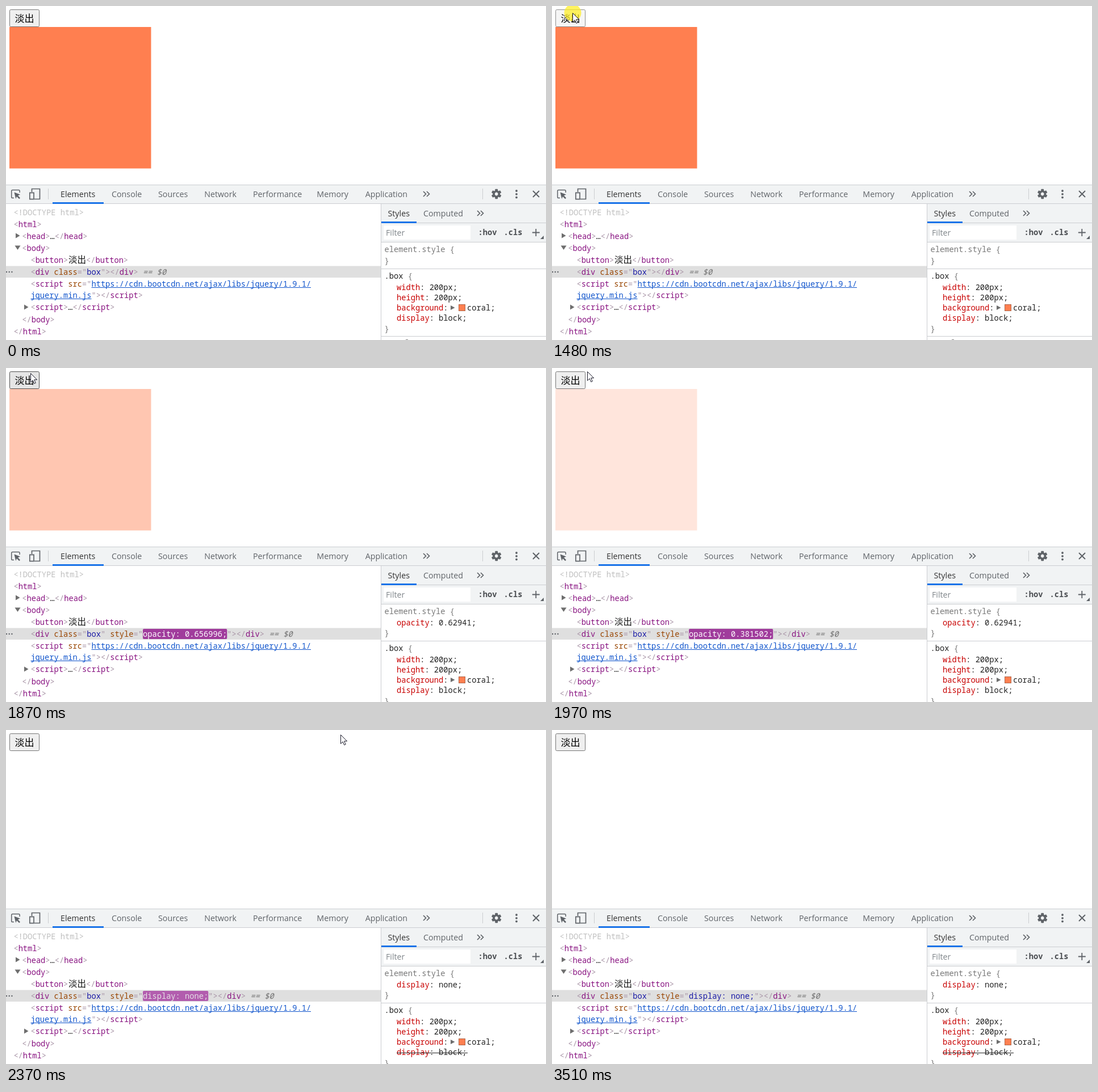
Write an HTML page that moves like this. It is 951x589 px and loops after 3990 ms.

```html
<!DOCTYPE html>
<html lang="en">
<head>
<meta charset="utf-8">
<title>Fade out in the inspector</title>
<style>
  html, body { margin: 0; width: 100%; height: 100%; overflow: hidden; background: #fff; }
  svg { display: block; width: 951px; height: 589px; }
  text { white-space: pre; }
  .code { font: 13.73px "Noto Sans Mono", "DejaVu Sans Mono", monospace; }
  .ui { font: 14.25px "Open Sans", "Noto Sans", sans-serif; }
  .cjk { font-family: "Noto Sans CJK SC", "Noto Sans CJK", sans-serif; font-weight: 300; }
  .bold { font-weight: bold; }
  .italic { font-style: italic; }
</style>
</head>
<body>
<svg id="stage" viewBox="0 0 951 589" xmlns="http://www.w3.org/2000/svg"></svg>
<script>
const NS = 'http://www.w3.org/2000/svg';
const stage = document.getElementById('stage');
const LOOP = 3990;
const CHAR = 8.238;

const TAG = '#a894a6', NAME = '#881280', ATTR = '#994500', VALUE = '#1a1aa6';
const LINK = '#1155cc', PROP = '#c80000', INK = '#222', GRAY = '#777', ICON = '#5f6368';
const BAR = '#f1f3f4', EDGE = '#cbcdd1', BLUE = '#1a73e8';

function el(type, attrs, parent = stage) {
  const node = document.createElementNS(NS, type);
  for (const key in attrs) node.setAttribute(key, attrs[key]);
  parent.appendChild(node);
  return node;
}
const rect = (x, y, width, height, fill, parent) => el('rect', { x, y, width, height, fill }, parent);
const path = (d, fill, parent) => el('path', { d, fill }, parent);
const stroke = (d, color, width = 1.6) =>
  el('path', { d, fill: 'none', stroke: color, 'stroke-width': width });

function label(x, y, content, fill, cls = 'ui', parent = stage) {
  const node = el('text', { x, y, fill, class: cls }, parent);
  node.textContent = content;
  return node;
}

// Coloured runs: color, text, color, text ...
function setRuns(node, runs) {
  node.textContent = '';
  for (let i = 0; i < runs.length; i += 2) {
    const span = el('tspan', { fill: runs[i] }, node);
    span.textContent = runs[i + 1];
  }
  return node;
}
const line = (x, y, runs, parent = stage) => setRuns(el('text', { x, y, class: 'code' }, parent), runs);
const open = name => [TAG, '<', NAME, name, TAG, '>'];
const close = name => [TAG, '</', NAME, name, TAG, '>'];

// Page
const box = rect(6, 37, 249.5, 249.5, '#ff7f50');
const button = el('rect', { x: 6.5, y: 6.5, width: 52, height: 30, rx: 2 });
const caption = label(15.5, 28, '淡出', '#000', 'cjk');
caption.setAttribute('font-size', 17.1);
const halo = el('circle', { cx: 36.5, cy: 12, r: 15, fill: '#ffee22', opacity: .72 });

// Toolbar
rect(0, 315, 951, 34, BAR);
rect(0, 315, 951, 1, EDGE);
rect(0, 348, 951, 1, EDGE);
rect(82, 346, 90, 3, BLUE);
rect(74, 322, 1, 19, EDGE);
rect(839, 322, 1, 19, EDGE);
stroke('M14 338.5H11.5Q9.7 338.5 9.7 336.7V326.3Q9.7 324.5 11.5 324.5H22.3Q24.1 324.5 24.1 326.3V329', ICON, 1.5);
path('M14.5 328.5L25 332.6L21 334.3L25 338.6L23.2 340.3L19 336L17.2 340Z', ICON);
stroke('M45.5 328V322.5H59.5V340.5H50', ICON, 1.7);
stroke('M41.8 329.3H49V340.7H41.8Z', ICON, 1.7);
[['Elements', 96], ['Console', 186], ['Sources', 268], ['Network', 349.2], ['Performance', 435],
 ['Memory', 547.3], ['Application', 632.7]].forEach(([name, x], i) => label(x, 337, name, i ? ICON : '#333'));

const chevrons = (x, y) =>
  stroke(`M${x} ${y - 4.5}l4.5 4.5l-4.5 4.5m6 -9l4.5 4.5l-4.5 4.5`, ICON, 1.7);
chevrons(735, 331.5);

const gear = el('g', { transform: 'translate(863.7 331.5)' });
for (let i = 0; i < 6; i++) {
  el('rect', { x: -2.4, y: -8.8, width: 4.8, height: 5, rx: .8, fill: ICON, transform: `rotate(${i * 60})` }, gear);
}
el('circle', { r: 4.7, fill: 'none', stroke: ICON, 'stroke-width': 3.6 }, gear);
for (const y of [326, 331.8, 337.6]) el('circle', { cx: 899, cy: y, r: 1.9, fill: ICON });
stroke('M928 326L939 337M939 326L928 337', ICON, 2);

// Element tree
rect(0, 458.5, 660, 20.5, '#dfdfdf');
for (const x of [1, 5.7, 10.4]) el('circle', { cx: x, cy: 469, r: 1.2, fill: ICON });
path('M17 400.5L24.5 405L17 409.5Z', '#6e6e6e');
path('M15.5 422.5H25.5L20.5 430Z', '#6e6e6e');
path('M32 526.5L39.5 531L32 535.5Z', '#6e6e6e');

const X = [13.4, 28.2, 43.4];
line(X[0], 369, ['#c0c0c0', '<!DOCTYPE html>']);
line(X[0], 390, open('html'));
line(X[1], 411, [...open('head'), INK, '…', ...close('head')]);
line(X[1], 432, open('body'));
line(X[2], 453, open('button'));
label(110, 453, '淡出', '#111', 'cjk').setAttribute('font-size', 15.5);
line(141, 453, close('button'));
const flash = el('rect', { x: 241, y: 460, height: 18, rx: 2 });
const divLine = line(X[2], 474, []);
const mark = label(0, 474, '== $0', '#6f6f6f', 'code italic');
line(X[2], 495, [TAG, '<', NAME, 'script', ATTR, ' src', TAG, '="', LINK, 'https://cdn.bootcdn.net/ajax/libs/jquery/1.9.1/']);
rect(150.5, 496, 386.5, 1, LINK);
line(X[2], 515, [LINK, 'jquery.min.js', TAG, '">', ...close('script')]);
rect(43.5, 516, 107, 1, LINK);
line(X[2], 536, [...open('script'), INK, '…', ...close('script')]);
line(X[1], 558, close('body'));
line(X[0], 579, close('html'));

// Styles pane
rect(660, 349, 1, 240, EDGE);
rect(661, 349, 290, 67, BAR);
rect(661, 382, 290, 1, EDGE);
rect(661, 380, 62, 3, BLUE);
label(672.5, 371, 'Styles', '#333');
label(735, 371, 'Computed', ICON);
chevrons(830, 365.5);
rect(665, 387, 153, 25, '#fff');
label(669, 405, 'Filter', '#80868b');
label(831.5, 404, ':hov', '#4a4d51', 'code bold');
label(876.5, 404, '.cls', '#4a4d51', 'code bold');
stroke('M926.8 399.5H939.8M933.3 393V406', ICON, 1.8);
path('M947 405V411H941Z', ICON);
rect(661, 416, 290, 1, EDGE);

line(666.5, 434, [GRAY, 'element.style {']);
const inlineRule = line(688, 454, []);
const rules = el('g', {});
const inlineEnd = line(666.5, 454, [GRAY, '}']);
rect(661, 463, 290, 1, EDGE, rules);
line(666.5, 481, [INK, '.box ', GRAY, '{'], rules);
const rule = (y, name, value) => line(688, y, [PROP, name, INK, ':' + value], rules);
rule(501, 'width', ' 200px;');
rule(519, 'height', ' 200px;');
rule(537, 'background', '');
path('M783 528L790.5 532L783 536Z', '#6e6e6e', rules);
el('rect', { x: 797.5, y: 526.5, width: 11, height: 11, fill: '#ff7f50', stroke: '#b0664a' }, rules);
line(812, 537, [INK, 'coral;'], rules);
rule(555, 'display', ' block;');
const strike = rect(688, 551, 125, 1, INK, rules);
line(666.5, 574, [GRAY, '}'], rules);
rect(661, 582, 290, 1, EDGE, rules);
rect(704, 588, 4, 1, '#888', rules);

const cursor = el('path', {
  d: 'M.5 .5V16.2L4.2 12.7L6.7 18.5L9.2 17.4L6.7 11.7H11.6Z',
  fill: '#fff', stroke: '#1b1b2b', 'stroke-width': 1
});

// Pointer stops: time, x, y
const stops = [
  [450, 813, 102], [530, 702, 68], [610, 528, 36], [690, 338, 13], [770, 172, 0], [850, 76, 2],
  [940, 36, 6], [1020, 38, 6], [1330, 37, 12], [1480, 36, 12], [1570, 37, 12], [1640, 37, 12],
  [1720, 37, 12], [1810, 39, 11], [1870, 43, 9], [1970, 62, 6], [2040, 128, 4], [2110, 249, 4],
  [2190, 370, 4], [2270, 488, 4], [2350, 589, 8], [2440, 712, 11], [2520, 819, 14]
];
const ticks = [0, ...stops.map(s => s[0]), 2580, 2660, 2750, 2880, 3030, 3130, 3230, 3380, 3440, 3510];

// Values the inspector shows lag behind the fade: time, tree value, pane value
const readings = [
  [1640, '0.998027', '0.998027'], [1720, '0.955702', '0.881898'], [1810, '0.812436', '0.881898'],
  [1870, '0.656996', '0.62941'], [1970, '0.381502', '0.62941'], [2040, '0.167808', '0.294243'],
  [2110, '0.0533143', '0.294243']
];
const FADE_START = 1548, FADE_TIME = 600, HIDDEN = 2190;

const clamp = v => Math.min(1, Math.max(0, v));
const progress = (t, from, to) => clamp((t - from) / (to - from));
const lastAt = (list, t) => list.filter(s => s[0] <= t).pop();
const mix = (a, b, k) => `rgb(${a.map((v, i) => Math.round(v + (b[i] - v) * k))})`;
const swing = p => .5 + Math.cos(Math.PI * p) / 2;

// Changed value: white on purple, then muted on pink, then its plain colour
const valueColor = t => t < 2970
  ? mix([255, 255, 255], [168, 148, 166], progress(t, HIDDEN, 2750))
  : mix([168, 148, 166], [26, 26, 166], progress(t, 2970, 3510));

function drawTree(t, styleText) {
  const runs = [TAG, '<', NAME, 'div', ATTR, ' class', TAG, '="', VALUE, 'box', TAG, '"'];
  if (styleText) runs.push(ATTR, ' style', TAG, '="', valueColor(t), styleText, TAG, '"');
  setRuns(divLine, [...runs, TAG, '>', ...close('div')]);
  const count = styleText ? 32 + styleText.length : 23;
  mark.setAttribute('x', X[2] + (count + 1) * CHAR);

  const faded = progress(t, 2170, 2970);
  flash.setAttribute('width', styleText.length * CHAR);
  flash.setAttribute('fill', mix([158, 54, 153], [240, 200, 238], faded));
  flash.setAttribute('opacity', .96 * (1 - faded ** 3));
}

function drawPane(name, value) {
  setRuns(inlineRule, name ? [PROP, name, INK, `: ${value};`] : []);
  const shift = `translate(0 ${name ? 18 : 0})`;
  rules.setAttribute('transform', shift);
  inlineEnd.setAttribute('transform', shift);
  strike.setAttribute('opacity', name === 'display' ? 1 : 0);
}

function draw(t) {
  const hidden = t >= HIDDEN;
  box.setAttribute('opacity', hidden ? 0 : swing(progress(t, FADE_START, FADE_START + FADE_TIME)));

  const pressed = t >= 1480 && t < 1570;
  const hover = t >= 940 && t < 1970 && !pressed;
  button.setAttribute('fill', pressed ? '#f5f5f5' : hover ? '#e5e5e5' : '#efefef');
  button.setAttribute('stroke', pressed ? '#8d8d8d' : hover ? '#4f4f4f' : '#767676');
  halo.setAttribute('visibility', pressed ? 'visible' : 'hidden');

  const stop = t < 2580 && lastAt(stops, t);
  cursor.setAttribute('visibility', stop ? 'visible' : 'hidden');
  if (stop) cursor.setAttribute('transform', `translate(${stop[1]} ${stop[2]})`);

  const reading = lastAt(readings, t);
  drawTree(t, hidden ? 'display: none;' : reading ? `opacity: ${reading[1]};` : '');
  if (hidden) drawPane('display', 'none');
  else if (reading) drawPane('opacity', reading[2]);
  else drawPane('', '');
}

let shown = -1;
const start = performance.now();
function frame() {
  const t = (performance.now() - start) % LOOP;
  const tick = ticks.filter(v => v <= t).pop();
  if (tick !== shown) draw(shown = tick);
  requestAnimationFrame(frame);
}
frame();
</script>
</body>
</html>
```
